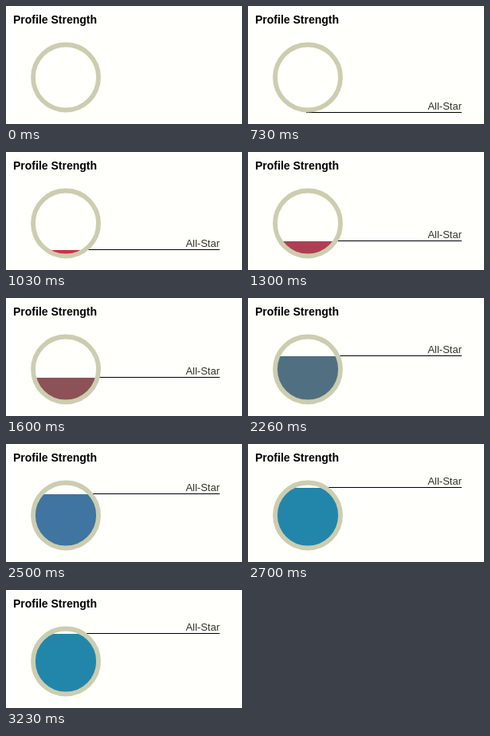
An HTML page that plays this animation: 296x148 px, repeating every 3.29 s.

```html
<!DOCTYPE html>
<html lang="en">
<head>
<meta charset="utf-8">
<title>Profile Strength</title>
<style>
  html, body { margin: 0; width: 100%; height: 100%; overflow: hidden; background: #fffffb; }
  body { position: relative; font-family: "Liberation Sans", Arial, sans-serif; }
  svg, div { position: absolute; white-space: nowrap; }
  svg { left: 0; top: 0; width: 296px; height: 148px; }
  .title { left: 9px; top: 9px; font: bold 14px/16px "Liberation Sans", Arial, sans-serif; color: #000; }
  #marker { left: 73px; top: 0; width: 195px; height: 1px; background: #000; visibility: hidden; }
  .label { right: 0; top: -15px; font-size: 13px; line-height: 15px; color: #333326; }
</style>
</head>
<body>
<div class="title">Profile Strength</div>
<div id="marker"><div class="label">All-Star</div></div>
<svg viewBox="0 0 296 148">
  <defs>
    <clipPath id="bowl"><circle cx="75" cy="89.5" r="39"/></clipPath>
  </defs>
  <circle cx="75" cy="89.5" r="41" fill="#fffffb"/>
  <g clip-path="url(#bowl)">
    <rect id="liquid" x="30" y="140" width="90" height="90"/>
  </g>
  <circle cx="75" cy="89.5" r="41" fill="none" stroke="#cccdb0" stroke-width="5.8"/>
</svg>
<script>
  const LOOP = 3290, SHOW = 730, RISE_START = 760, RISE_TIME = 1930;
  const BOTTOM = 133, TOP = 54;

  // progress of the rise, then red, green, blue
  const tints = [
    [0, 222, 40, 62],
    [0.28, 176, 62, 82],
    [0.57, 109, 99, 92],
    [0.777, 80, 112, 130],
    [0.9, 64, 117, 160],
    [1, 34, 134, 170]
  ];

  const marker = document.getElementById("marker");
  const liquid = document.getElementById("liquid");
  const start = performance.now();

  function tintAt(p) {
    const i = Math.max(1, tints.findIndex(s => s[0] >= p));
    const a = tints[i - 1], b = tints[i];
    const k = (p - a[0]) / (b[0] - a[0]);
    const rgb = [1, 2, 3].map(c => Math.round(a[c] + (b[c] - a[c]) * k));
    return `rgb(${rgb})`;
  }

  function draw(t) {
    const p = Math.min(1, Math.max(0, (t - RISE_START) / RISE_TIME));
    const y = Math.round(BOTTOM + (TOP - BOTTOM) * p);
    marker.style.visibility = t >= SHOW ? "visible" : "hidden";
    marker.style.top = y + "px";
    liquid.setAttribute("y", y + 1);
    liquid.setAttribute("fill", tintAt(p));
  }

  function tick() {
    draw((performance.now() - start) % LOOP);
    requestAnimationFrame(tick);
  }
  tick();
</script>
</body>
</html>
```
